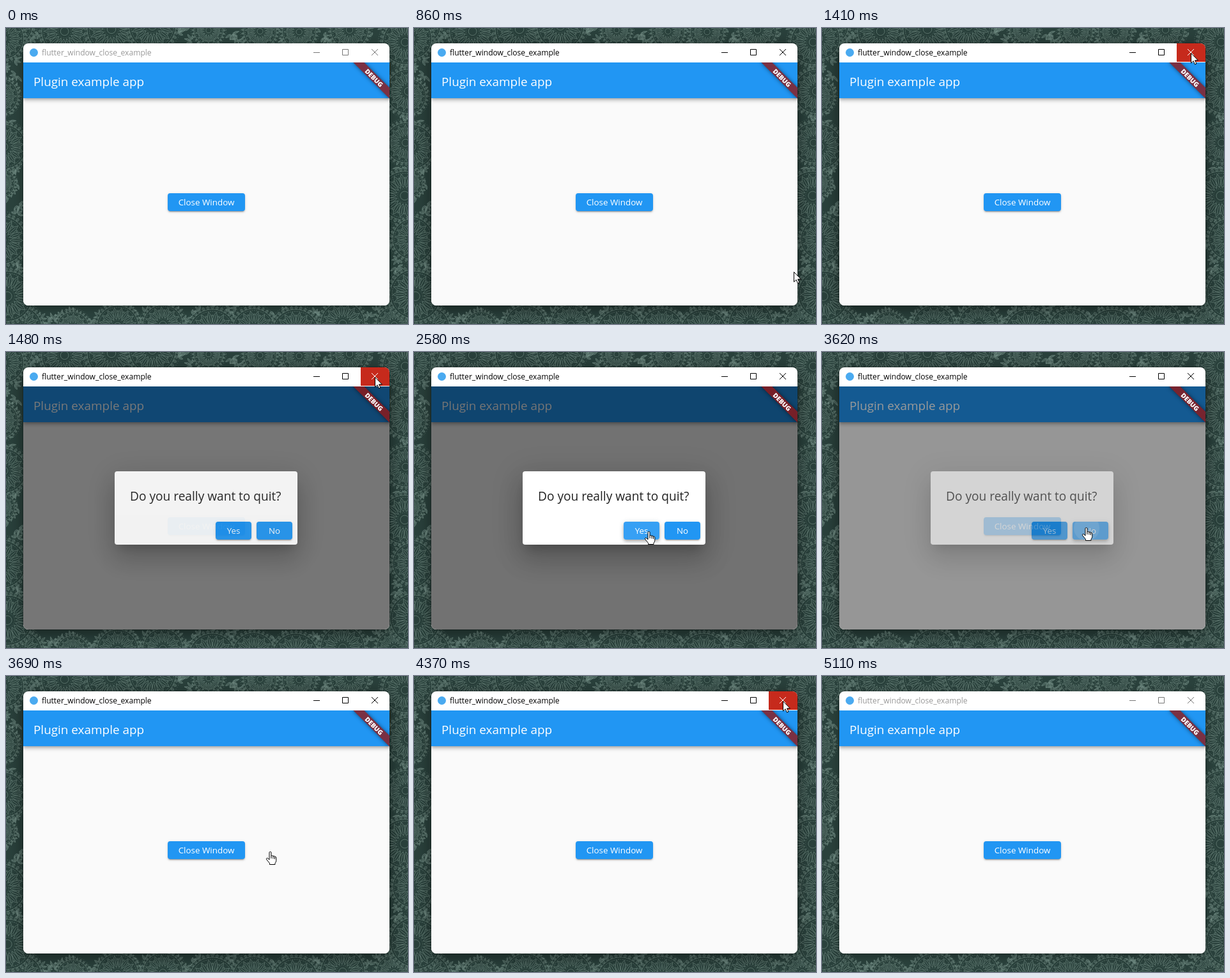
These frames come from a looping animation (629 px wide and 464 px high, 5170 ms). An HTML page with a canvas:

```html
<!DOCTYPE html>
<html lang="en">
<head>
<meta charset="utf-8">
<title>Window close confirmation</title>
<style>
  html, body { margin: 0; width: 100%; height: 100%; overflow: hidden; background: #2a413c; }
  body { position: relative; font-family: "Open Sans", "Noto Sans", sans-serif; }
  div, canvas, svg { position: absolute; box-sizing: border-box; white-space: nowrap; }
  canvas { left: 0; top: 0; }
  #window { left: 27px; top: 24px; width: 573px; height: 411px; border-radius: 8px;
    box-shadow: 0 0 0 1px rgba(0,0,0,.12), 0 3px 14px rgba(0,0,0,.35); }
  #window.active { box-shadow: 0 0 0 1px rgba(0,0,0,.2), 0 5px 24px rgba(0,0,0,.5); }
  #frame { inset: 0; border-radius: 8px; overflow: hidden; background: #fff; }
  #title { left: 29px; top: 0; line-height: 30px; font-size: 12.1px; color: #999; }
  .active #title { color: #000; }
  #badge { left: 10px; top: 8px; width: 13px; height: 13px; border-radius: 50%; background: #4aaaf0; }
  #close { left: 528px; top: 0; width: 45px; height: 29px; }
  #close.hot { background: #c62a1c; }
  #controls { left: 0; top: 0; fill: none; stroke: #777; }
  .active #controls { stroke: #000; }
  .active #controls .hot { stroke: #fff; }
  #app { left: 0; top: 30px; width: 573px; height: 381px; overflow: hidden; background: #fafafa; }
  #bar { left: 0; top: 0; width: 573px; height: 56px; padding-left: 16px; background: #2196f3;
    color: #fff; font-size: 18.9px; font-weight: 500; line-height: 60px;
    box-shadow: 0 2px 4px -1px rgba(0,0,0,.2), 0 4px 5px rgba(0,0,0,.14), 0 1px 10px rgba(0,0,0,.12); }
  .button { height: 28px; border-radius: 4px; overflow: hidden; background: #2196f3; color: #fff;
    font-size: 13.4px; font-weight: 500; line-height: 29px; text-align: center;
    box-shadow: 0 3px 1px -2px rgba(0,0,0,.2), 0 2px 2px rgba(0,0,0,.14), 0 1px 5px rgba(0,0,0,.12); }
  .button.hot { background: #37a0f4;
    box-shadow: 0 2px 4px -1px rgba(0,0,0,.2), 0 4px 5px rgba(0,0,0,.14), 0 1px 10px rgba(0,0,0,.12); }
  #open { left: 226px; top: 205px; width: 121px; }
  #barrier { inset: 0; background: rgba(0,0,0,.54); }
  #dialog { left: 143px; top: 133px; width: 286px; height: 115px; border-radius: 4px; background: #fff;
    box-shadow: 0 11px 15px -7px rgba(0,0,0,.2), 0 24px 38px 3px rgba(0,0,0,.14), 0 9px 46px 8px rgba(0,0,0,.12); }
  #question { left: 24px; top: 24px; line-height: 30px; font-size: 19.1px; color: #212121; }
  #yes, #no { top: 79px; width: 56px; }
  #yes { left: 158px; }
  #no { left: 222px; }
  #ripple { left: 22px; top: 10px; border-radius: 50%; background: rgba(255,255,255,.14); transform: translate(-50%, -50%); }
  #ribbon { left: 533px; top: 28px; width: 80px; height: 12px; transform-origin: 40px -28px; transform: rotate(45deg);
    background: linear-gradient(rgba(183,28,28,.63), rgba(183,28,28,.63)), rgba(0,0,0,.45);
    box-shadow: 0 0 6px rgba(0,0,0,.5); color: #fff; font-size: 10.2px; font-weight: 800; line-height: 12px; text-align: center; }
  #cursor { left: 0; top: 0; overflow: visible; fill: #fff; stroke: #000; }
</style>
</head>
<body>
<canvas id="wallpaper" width="629" height="464"></canvas>
<div id="window">
  <div id="frame">
    <div id="badge"></div>
    <div id="title">flutter_window_close_example</div>
    <div id="close"></div>
    <svg id="controls" width="573" height="30">
      <path d="M454 14.5h10M499.5 9.5h9v9h-9z"/>
      <path id="cross" d="M545 9l10 10M555 9l-10 10"/>
    </svg>
    <div id="app">
      <div id="bar">Plugin example app</div>
      <div id="open" class="button">Close Window</div>
      <div id="barrier"></div>
      <div id="dialog">
        <div id="question">Do you really want to quit?</div>
        <div id="yes" class="button">Yes</div>
        <div id="no" class="button">No<div id="ripple"></div></div>
      </div>
      <div id="ribbon">DEBUG</div>
    </div>
  </div>
</div>
<svg id="cursor" width="1" height="1">
  <path id="arrow" d="M.5.5V16l3.6-3.3 2.4 5.4 2.5-1.1-2.4-5.2h4.8z"/>
  <path id="hand" d="M-2 1.8Q-2 .5-.5 .5T1 1.8V7.5Q1 6.5 2.5 6.5T4 8Q4 7 5.2 7T6.5 9Q6.7 8 7.7 8.2T8.8 10V14.5Q8.5 17 7 18.5V20.5H-1.5V18.5L-6 13Q-7.2 11-5.8 10.4T-2 13ZM1 7.5V11M4 8V11.5M6.5 9V12"/>
</svg>
<script>
const $ = id => document.getElementById(id);
const LOOP = 5170, ACTIVATE = 790, DEACTIVATE = 5110, TICK = 68.87;

const ENTRY = { x: 597, y: 444 }, CLOSE = { x: 577, y: 39 }, YES = { x: 368, y: 281 },
  NO = { x: 414, y: 275 }, EXIT = { x: 475, y: 432 };
const MOVES = [
  { from: 720, to: 1280, target: CLOSE },
  { from: 1820, to: 2440, target: YES },
  { from: 2580, to: 3490, target: NO },
  { from: 3820, to: 4370, target: CLOSE },
  { from: 4370, to: 4430, target: EXIT },
];

const ramp = (t, from, to) => Math.min(1, Math.max(0, (t - from) / (to - from)));
const easeOut = (p, power) => 1 - (1 - p) ** power;
const smooth = p => p * p * (3 - 2 * p);
const screenTick = t => ACTIVATE + TICK * Math.floor((t - ACTIVATE) / TICK + .15);

function pointerAt(t) {
  let { x, y } = ENTRY;
  for (const { from, to, target } of MOVES) {
    const p = smooth(ramp(t, from, to));
    x += (target.x - x) * p;
    y += (target.y - y) * p;
  }
  return { x: Math.round(x), y: Math.round(y) };
}

function markHover(id, pointer) {
  const box = $(id).getBoundingClientRect();
  const hot = !!pointer && pointer.x >= box.left && pointer.x < box.right && pointer.y >= box.top && pointer.y < box.bottom;
  $(id).classList.toggle("hot", hot);
  return hot;
}

function render(time) {
  const t = screenTick(time);
  const visible = (time >= 390 && time < 460) || (time >= ACTIVATE && time < 4510);
  const pointer = visible && pointerAt(t);
  $("window").classList.toggle("active", time >= ACTIVATE && time < DEACTIVATE);

  const progress = ramp(t, 1411, 1508) - ramp(t, 3518, 3668);
  $("dialog").style.opacity = easeOut(progress, 2);
  $("barrier").style.opacity = easeOut(progress, 3);
  const size = t < 3470 ? 0 : 24 + 32 * ramp(t, 3540, 3690);
  $("ripple").style.width = $("ripple").style.height = size + "px";

  $("cross").classList.toggle("hot", markHover("close", pointer));
  const overYes = markHover("yes", pointer), overNo = markHover("no", pointer);
  const hand = time > 1610 && time < 3890 && (overYes || overNo);

  $("cursor").style.display = visible ? "" : "none";
  if (visible) $("cursor").style.transform = `translate(${pointer.x}px, ${pointer.y}px)`;
  $("hand").style.display = hand ? "" : "none";
  $("arrow").style.display = hand ? "none" : "";
}

function paintWallpaper() {
  const g = $("wallpaper").getContext("2d"), BASE = "#2a413c", TURN = Math.PI * 2;
  let seed = 11;
  const random = () => (seed = seed * 16807 % 2147483647) / 2147483647;
  const vary = amount => (random() - .5) * amount;
  const ring = (x, y, r, beads = []) => {
    g.setLineDash(beads);
    g.beginPath();
    g.arc(x, y, r, 0, TURN);
    g.stroke();
    g.setLineDash([]);
  };

  function leaf(x, y, angle, start, length, width) {
    g.save();
    g.translate(x, y);
    g.rotate(angle);
    g.beginPath();
    g.moveTo(start, 0);
    g.quadraticCurveTo(start + length * .5, width, start + length, 0);
    g.quadraticCurveTo(start + length * .5, -width, start, 0);
    g.moveTo(start + length * .2, 0);
    g.lineTo(start + length * .8, 0);
    g.stroke();
    g.restore();
  }

  function palmette(x, y, r) {
    const leaves = Math.round(9 + r / 5), turn = random();
    g.beginPath();
    g.arc(x, y, r, 0, TURN);
    g.fill();
    ring(x, y, r * .16);
    ring(x, y, r * .26, [1, 2]);
    ring(x, y, r * .82, [2, 1.5]);
    ring(x, y, r * .9);
    ring(x, y, r * 1.08, [1, 2.5]);
    for (let i = 0; i < leaves * 2; i++) {
      const angle = turn + i * TURN / leaves / 2;
      leaf(x, y, angle, r * .9, r * .13, r * .1);
      if (i % 2) leaf(x, y, angle, r * .3, r * .5, r * .17);
      else ring(x + Math.cos(angle) * r * .66, y + Math.sin(angle) * r * .66, 1);
    }
  }

  function sprig(x, y) {
    const turn = random() * TURN;
    for (let i = 0; i < 5; i++) leaf(x, y, turn + i * .7, 2, 6 + random() * 5, 3);
  }

  g.fillStyle = BASE;
  g.fillRect(0, 0, 629, 464);
  g.strokeStyle = "#7f9a91";
  g.globalAlpha = .75;
  g.lineWidth = .8;

  const along = (length, step, draw) => {
    for (let d = step / 4; d < length; d += step) draw(d + vary(step / 3));
  };
  for (const y of [8, 448]) along(629, 12, x => sprig(x, y + vary(24)));
  for (const x of [10, 615]) along(464, 12, y => sprig(x + vary(24), y));
  g.globalAlpha = 1;
  g.strokeStyle = "#667f77";
  for (const y of [0, 472]) along(629, 74, x => palmette(x, y + vary(18), 25 + random() * 19));
  for (const x of [-2, 632]) along(464, 78, y => palmette(x + vary(18), y, 25 + random() * 19));
}

function frame() {
  render(performance.now() % LOOP);
  requestAnimationFrame(frame);
}

paintWallpaper();
frame();
</script>
</body>
</html>
```
